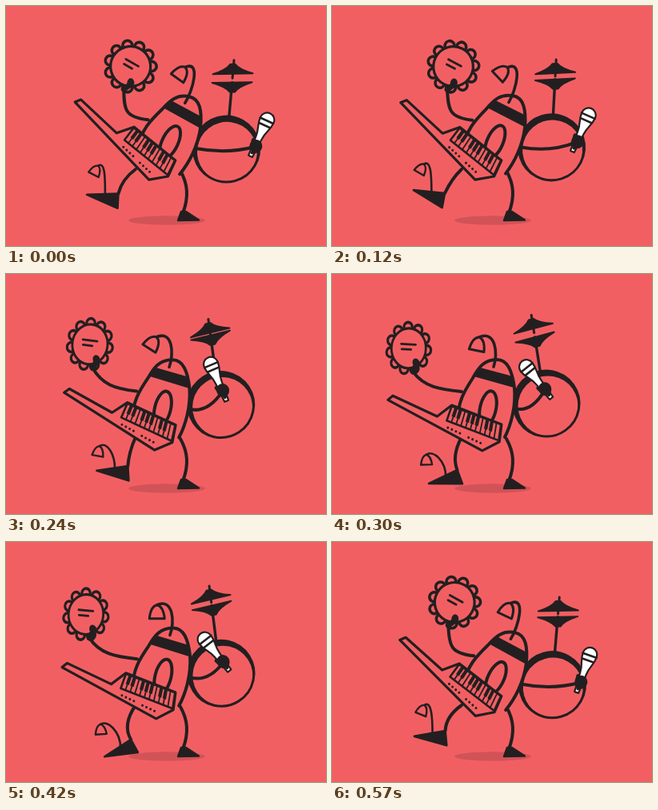
An HTML page with a canvas that plays this animation: 400 px wide and 300 px high, repeating every 600 ms.

```html
<!DOCTYPE html>
<html lang="en">
<head>
<meta charset="utf-8">
<title>One-man band</title>
<style>
html, body { margin: 0; width: 100%; height: 100%; overflow: hidden; background: #f25f63; }
canvas { display: block; width: 400px; height: 300px; }
</style>
</head>
<body>
<canvas id="stage" width="400" height="300"></canvas>
<script>
const ctx = document.getElementById('stage').getContext('2d');
const BG = '#f25f63', INK = '#231f20', SHADE = '#d15357';
const LOOP = 600, STEP = 30, RAD = Math.PI / 180, TAU = Math.PI * 2;

// 0 at the right end of the sway, 1 at the left end; parts follow with a lag
function sway(t, lag) {
  const s = (1 - Math.cos(TAU * (t - lag) / LOOP)) / 2;
  return s * s * (3 - 2 * s);
}

// The hi-hat claps twice per loop
function clap(t) {
  const s = (1 - Math.cos(2 * TAU * (t - 195) / LOOP)) / 2;
  return Math.min(1, 1.4 * s);
}

const mix = (a, b, w) => a + (b - a) * w;

function turn(x, y, deg) {
  const c = Math.cos(deg * RAD), s = Math.sin(deg * RAD);
  return [x * c - y * s, x * s + y * c];
}

function place(x, y, deg, draw) {
  ctx.save();
  ctx.translate(x, y);
  ctx.rotate(deg * RAD);
  draw();
  ctx.restore();
}

function stroke(width, path) {
  ctx.lineWidth = width;
  ctx.strokeStyle = INK;
  path ? ctx.stroke(path) : ctx.stroke();
}

function fill(color, path) {
  ctx.fillStyle = color;
  path ? ctx.fill(path) : ctx.fill();
}

function poly(points, color, width) {
  ctx.beginPath();
  points.forEach(p => ctx.lineTo(p[0], p[1]));
  ctx.closePath();
  fill(color);
  if (width) stroke(width);
}

function line(x1, y1, x2, y2, width) {
  ctx.beginPath();
  ctx.moveTo(x1, y1);
  ctx.lineTo(x2, y2);
  stroke(width);
}

function oval(x, y, rx, ry, deg = 0) {
  ctx.beginPath();
  ctx.ellipse(x, y, rx, ry, deg * RAD, 0, TAU);
}

function curve(a, b, c, d, width) {
  ctx.beginPath();
  ctx.moveTo(...a);
  ctx.bezierCurveTo(...b, ...c, ...d);
  stroke(width);
}

function bow(a, b, c, width) {
  ctx.beginPath();
  ctx.moveTo(...a);
  ctx.quadraticCurveTo(...b, ...c);
  stroke(width);
}

// Body parts are laid out upright, then leaned about the hips
const HIP = [190, 212];
function onBody(x, y, lean) {
  const p = turn(x - HIP[0], y - HIP[1], lean);
  return [p[0] + HIP[0], p[1] + HIP[1]];
}

const torso = new Path2D('M216 204C224 188 230 165 228 142C225 120 219 107 206 107' +
  'C190 107 183 117 176 130C165 147 157 160 157 185');

function body(lean) {
  ctx.save();
  ctx.translate(...HIP);
  ctx.rotate(lean * RAD);
  ctx.translate(-HIP[0], -HIP[1]);
  fill(BG, torso);
  ctx.save();
  ctx.clip(torso);
  poly([[174, 114], [234, 130], [234, 144], [170, 126]], INK);
  ctx.restore();
  stroke(4, torso);
  oval(195, 168, 10, 22, 12);
  stroke(4);
  ctx.restore();
}

function bell(x, y, tilt, half, tall, width) {
  place(x, y, tilt, () => {
    ctx.beginPath();
    ctx.moveTo(-half, tall);
    ctx.bezierCurveTo(1 - half, tall * 0.4, -half * 0.5, 1, 0, 0);
    ctx.bezierCurveTo(half * 0.5, 1, half - 1, tall * 0.4, half, tall);
    ctx.closePath();
    fill(BG);
    stroke(width);
  });
}

function headBell(t, lean) {
  const w = sway(t, 28), x = mix(224, 184, w), y = mix(76.5, 79, w);
  curve(onBody(202, 116, lean), onBody(208, 99, lean), [x + 20, y - 9], [x, y], 3.6);
  bell(x, y, mix(47, 0, sway(t, 115)), 9.5, 17, 3);
}

function cymbal(dist, dir) {
  place(0, -dist, -6, () => {
    ctx.beginPath();
    ctx.moveTo(-25, 0);
    ctx.quadraticCurveTo(-8, -5 * dir, -3, -12 * dir);
    ctx.lineTo(3, -12 * dir);
    ctx.quadraticCurveTo(8, -5 * dir, 25, 0);
    ctx.closePath();
    fill(INK);
    stroke(2);
  });
}

function drum(w, gap, lean) {
  const x = mix(275.5, 268, w), y = mix(179, 162, w);
  place(mix(279, 260, w), y - 42, mix(5, -9, w), () => {
    line(0, 6, 0, gap / 2 - 47, 3.4);
    line(0, -47, 0, -64 - gap / 2, 3);
    cymbal(47 + gap / 2, 1);
    cymbal(47 - gap / 2, -1);
  });
  place(x, y, -35 + lean * 1.5, () => {
    oval(0, 0, 41, 41);
    fill(BG);
    stroke(3);
    ctx.beginPath();
    ctx.arc(0, 0, 41, 0, TAU);
    ctx.arc(0, 3.5, 37.5, 0, TAU, true);
    fill(INK);
  });
}

function legs(t) {
  const w = sway(t, 80), tilt = mix(33, -6, sway(t, 108));
  const heel = [mix(137.5, 165, w), mix(252, 263, w)];
  const onFoot = (x, y) => turn(x, y, tilt).map((v, i) => v + heel[i]);
  const ankle = onFoot(-7, -17), root = onFoot(-21, -8);
  bow([162, 204], [ankle[0] - 8 + tilt * 0.5, ankle[1] - 18], ankle, 4);
  place(...heel, tilt, () => poly([[0, 0], [-42, 1], [-7, -17]], INK, 2.6));

  const x = mix(115, 118, w), y = mix(197.5, 228, w);
  curve(root, [root[0], root[1] - 20], [x + 9, y - 6], [x, y], 2.6);
  bell(x, y, mix(30, -4, w), 7, 12.5, 2.4);

  curve([218, 206], [227, 222], [229, 238], [221, 259], 4);
  poly([[215, 268], [219, 257], [225, 257], [241, 267.5]], INK, 2.4);
}

function keytar(w) {
  place(mix(178.5, 188, w), mix(217, 221, w), mix(46.7, 28, w), () => {
    poly([[0, 0], [-134, 0], [-131, -7.5], [-70, -11], [-60.5, -32], [5.5, -40.5], [13.5, -20]], BG, 3.2);
    const spot = (u, v) => [-60 + 65 * u + v * (3 + 4 * u), -31 - 9 * u + 19 * v];
    poly([spot(0, 0), spot(1, 0), spot(1, 1), spot(0, 1)], BG, 2.6);
    const keys = 11, half = 0.032;
    for (let i = 1; i < keys; i++) {
      const u = i / keys;
      line(...spot(u, 0), ...spot(u, 1), 1.8);
      if (i % 7 !== 3 && i % 7 !== 0) {
        poly([spot(u - half, 0), spot(u + half, 0), spot(u + half, 0.62), spot(u - half, 0.62)], INK);
      }
    }
    for (let i = 0; i < 8; i++) {
      oval(-51.5 + i * 5.5 + (i > 3 ? 6.5 : 0), -5 - i * 0.35, 1.5, 1.5);
      fill(INK);
    }
  });
}

function tambourine(w, lean) {
  const x = mix(156, 95.5, w), y = mix(75.5, 93, w * w), tilt = mix(30, 3, w);
  const [wx, wy] = turn(7, 29, tilt);
  const wrist = [x + wx, y + wy], sh = onBody(162, 147, lean);
  curve(sh, [sh[0] - 28, sh[1] - 3], [wrist[0] + 14 * w, wrist[1] + 27 - 8 * w], wrist, 4);
  place(x, y, tilt, () => {
    ctx.save();
    ctx.scale(mix(1, 0.86, w), 1);
    const bumps = 11;
    for (let i = 0; i < bumps; i++) {
      const a = i / bumps * TAU - 30 * RAD;
      oval(26.5 * Math.cos(a), 26.5 * Math.sin(a), 6, 6);
      fill(BG);
      stroke(3.6);
    }
    oval(0, 0, 25, 25);
    fill(BG);
    stroke(3.2);
    ctx.restore();
    line(-9.5, -5, 8.5, -5, 2.8);
    line(-8.5, 1.5, 3, 1.5, 2.8);
    line(7, 29, 10, 22, 7);
    oval(10.5, 18, 4.5, 6, -25);
    fill(INK);
  });
}

function mic(t, lean) {
  const x = mix(311, 266, sway(t, 28)), y = mix(176, 145, sway(t, 14));
  const sh = onBody(228, 168, lean);
  bow(sh, [(sh[0] + x) / 2 + 2, (sh[1] + y) / 2 + 8 + (177 - y) * 0.3], [x, y], 4);
  place(x, y, mix(26, -40, sway(t, 57)), () => {
    ctx.beginPath();
    ctx.arc(0, -37, 9, Math.PI, TAU);
    ctx.bezierCurveTo(9, -26, 4.5, -24, 4, -12);
    ctx.lineTo(2.6, 13);
    ctx.lineTo(-2.6, 13);
    ctx.lineTo(-4, -12);
    ctx.bezierCurveTo(-4.5, -24, -9, -26, -9, -37);
    ctx.closePath();
    fill('#fff');
    stroke(2.2);
    line(-9, -36, 9, -36, 2.6);
    line(-7.5, -29.5, 7.5, -29.5, 2.6);
    oval(1, -1, 8, 8.5);
    fill(INK);
    line(-5, -7, -3, 3, 5);
    line(4, 3, 0, 8, 4);
  });
}

function render(t) {
  const trunk = sway(t, 25), lean = mix(13.3, 0, trunk);
  ctx.fillStyle = BG;
  ctx.fillRect(0, 0, 400, 300);
  ctx.lineCap = ctx.lineJoin = 'round';
  oval(201, 268, 48, 5.7);
  fill(SHADE);
  drum(trunk, 11 * clap(t), lean);
  legs(t);
  body(lean);
  headBell(t, lean);
  tambourine(sway(t, 40), lean);
  keytar(sway(t, 54));
  mic(t, lean);
}

const start = performance.now();
function tick(now) {
  const t = Math.max(0, now - start) % LOOP;
  render(Math.floor(t / STEP) * STEP);
  requestAnimationFrame(tick);
}
render(0);
requestAnimationFrame(tick);
</script>
</body>
</html>
```
